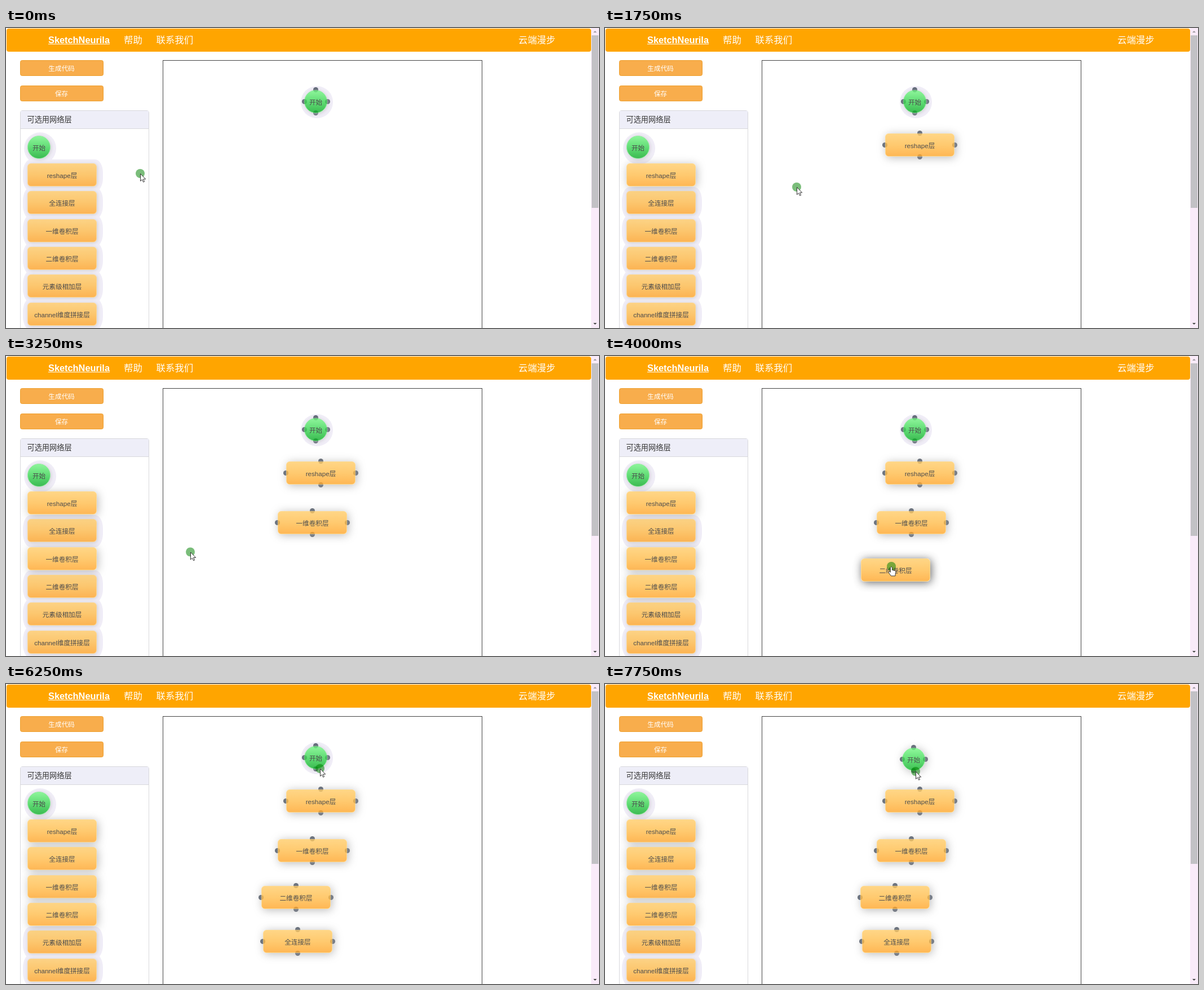
Recreate the animation shown at these times as an HTML page. Size 1052 by 532 pixels, loop 8 s.

```html
<!DOCTYPE html>
<html lang="zh-CN">
<head>
<meta charset="utf-8">
<title>Network editor</title>
<style>
html, body { margin: 0; width: 100%; height: 100%; overflow: hidden; background: #fff; }
body { position: relative; font: 11.6px "Liberation Sans", "Noto Sans CJK SC", "Noto Sans CJK", sans-serif; color: #333; }
body *, #cursor { position: absolute; box-sizing: border-box; white-space: nowrap; }
#bar { left: 1px; top: 1px; width: 1037px; height: 41px; border-radius: 4px; background: #ffa500; color: #fff; font-size: 16.4px; line-height: 40px; }
#bar b { left: 74px; font-size: 16.35px; text-decoration: underline; }
.button { left: 24.5px; width: 148px; height: 28px; border: 1px solid #ee9f2d; border-radius: 3.5px; background: #f8ad4c; color: #fff; line-height: 27px; text-align: center; }
#panel { left: 24.5px; top: 146px; width: 229px; height: 420px; border: 1px solid #d8d8dc; border-radius: 4px 4px 0 0; }
#title { left: 0; top: 0; width: 227px; height: 32px; padding-left: 12px; border-bottom: 1px solid #d8d8dc; background: #eeeef8; font-size: 13.2px; line-height: 31px; }
#board { left: 278px; top: 57px; width: 567px; height: 500px; border: 1px solid #444; }
#scroll { left: 1038px; top: 0; width: 14px; height: 532px; background: #f9ebf9; }
#thumb { left: 1px; top: 13px; width: 12px; height: 306px; background: #c2c1c5; }
.tri { left: 4px; border: 3.5px solid transparent; }
.node { left: -61.5px; top: -20.5px; width: 123px; height: 41px; border: 1px solid #ffd179; border-radius: 6px; opacity: .8;
  background: linear-gradient(#ffcc68, #ffbd4c 50%, #ffa62b); box-shadow: 2px 2px 16px #aaa; text-align: center; line-height: 41px; color: #222; }
.round .node { left: -20.5px; width: 41px; border: 1px solid #70ec80; border-radius: 50%; background: linear-gradient(#75f784, #3fd956 50%, #0eaf28); }
.halo { left: -69.5px; top: -28px; width: 142px; height: 57px; border-radius: 14px / 24px; background: #f0edf7; }
.round .halo { left: -27px; top: -27px; width: 57px; height: 57px; border-radius: 50%; }
.lit .node { box-shadow: 1px 1px 6px #c4c4c6; }
.ghost .node { box-shadow: 2px 2px 16px #444; }
.port { width: 9px; height: 9px; margin: -4.5px; border-radius: 50%; background: #5c6573; }
#cursor { left: 0; top: 0; overflow: visible; }
</style>
</head>
<body>
<div id="bar"><b>SketchNeurila</b><span style="left:208px">帮助</span><span style="left:265.5px">联系我们</span><span style="left:908px">云端漫步</span></div>
<div class="button" style="top:57px">生成代码</div>
<div class="button" style="top:101.5px">保存</div>
<div id="panel"><div id="title">可选用网络层</div></div>
<div id="board"></div>
<div id="halos"></div>
<div id="nodes"></div>
<div id="scroll">
  <div id="thumb"></div>
  <div class="tri" style="top:2px;border-bottom-color:#9c989e"></div>
  <div class="tri" style="top:523px;border-top-color:#444"></div>
</div>
<svg id="cursor" width="1" height="1">
  <circle id="spot" r="8" fill="green" fill-opacity=".52"/>
  <path id="arrow" d="M.5 .5V13.5L3.5 10.8 5.6 15.3 7.6 14.4 5.6 10H9.7Z" fill="#fff" stroke="#222" stroke-width=".9"/>
  <path id="hand" d="M-1.7 2Q0-.5 1.5 2V6.5L6 7.5Q8 8 8 10L7 14V17H-.5L-4.6 11.5Q-5.5 8.5-3 9L-1.7 10.5Z" fill="#fff" stroke="#222" stroke-width=".9"/>
</svg>
<script>
const $ = id => document.getElementById(id);
const STEP = 250, COUNT = 32;

function add(parent, cls, text = '') {
  const el = document.createElement('div');
  el.className = cls;
  el.textContent = text;
  return parent.appendChild(el);
}

function makeNode(text, kind, ports) {
  const halo = add($('halos'), kind), body = add($('nodes'), kind);
  add(halo, 'halo');
  if (ports) {
    const w = kind === 'round' ? 20.5 : 62;
    for (const [x, y] of [[0, -21], [w, 0], [0, 20.5], [-w, 0]])
      add(body, 'port').style.cssText = `left:${x}px;top:${y}px`;
  }
  add(body, 'node', text);
  return {
    move(x, y) { for (const el of [halo, body]) el.style.cssText = `left:${x}px;top:${y}px`; },
    lit(on) { halo.hidden = !on; body.classList.toggle('lit', on); },
    show(on) { body.style.display = on ? '' : 'none'; },
    ghost(on) { body.classList.toggle('ghost', on); }
  };
}

// Linear path through [step, x, y] points.
function along(points, k) {
  const i = Math.max(1, points.findIndex(p => p[0] >= k));
  const [a, x, y] = points[i - 1], [b, u, v] = points[i] || points[i - 1];
  const f = b > a ? Math.min(1, Math.max(0, (k - a) / (b - a))) : 0;
  return [x + (u - x) * f, y + (v - y) * f];
}

const names = ['reshape层', '全连接层', '一维卷积层', '二维卷积层', '元素级相加层', 'channel维度拼接层'];
const first = makeNode('开始', 'round');
first.move(58.5, 211.5);
first.lit(true);
const list = names.map((name, i) => {
  const node = makeNode(name, '');
  node.move(99.5, 260.5 + 49.3 * i);
  node.lit(true);
  return node;
});

const start = makeNode('开始', 'round', true);

// Each drag: list item, step of the drop, resting place, path of the dragged copy.
const drags = [
  [0, 6, [558.5, 207.5], [[3, 250, 252], [5, 578.5, 219.5]]],
  [2, 12, [543.5, 295.5], [[10, 414.5, 303.5], [11, 531.5, 297.5]]],
  [3, 17, [514.5, 378.5], [[15, 315, 394], [16, 515.5, 379.5]]],
  [1, 22, [517.5, 456.5], [[20, 518.5, 478.5], [21, 518.5, 462.5]]]
].map(([item, drop, home, path]) => ({
  item, drop, home, path, from: path[0][0],
  held: makeNode(names[item], ''), placed: makeNode(names[item], '', true)
}));
for (const d of drags) {
  d.placed.move(...d.home);
  d.placed.lit(false);
  d.held.lit(false);
  d.held.ghost(true);
}

const mouse = [
  [0, 238, 258], [2, 110, 262], [3, 260.5, 253.5], [5, 589, 221], [6, 560, 208],
  [7, 340, 282], [9, 128, 355], [10, 128, 355], [11, 560, 294], [12, 562, 292],
  [14, 92, 403], [16, 508, 373], [17, 508, 372], [19, 108, 310], [20, 527, 478],
  [22, 526, 456], [24, 600, 230], [25, 557, 150], [27, 577, 177], [28, 553, 135],
  [29, 550, 139], [30, 550, 155], [31, 551, 155]
];
const clicks = [2, 10, 14, 19, 28];

function draw(k) {
  let hand = k === 28 || k === 29;
  for (const d of drags) {
    const held = k >= d.from && k < d.drop;
    d.held.show(held);
    if (held) d.held.move(...along(d.path, k));
    d.placed.show(k >= d.drop);
    list[d.item].lit(k < d.from);
    hand ||= held && k !== 10;
  }
  start.move(...(k < 29 ? [549.5, 130] : k < 31 ? [548.5, 133] : [547.5, 133]));
  start.lit(k < 29);

  const [x, y] = along(mouse, k), click = clicks.includes(k);
  $('cursor').style.transform = `translate(${x}px,${y}px)`;
  $('arrow').style.display = hand ? 'none' : '';
  $('hand').style.display = hand ? '' : 'none';
  $('spot').style.stroke = click ? '#e8200c' : 'none';
  $('spot').style.strokeWidth = 2;
}

function tick(now) {
  draw(Math.floor(now / STEP) % COUNT);
  requestAnimationFrame(tick);
}
draw(0);
requestAnimationFrame(tick);
</script>
</body>
</html>
```
